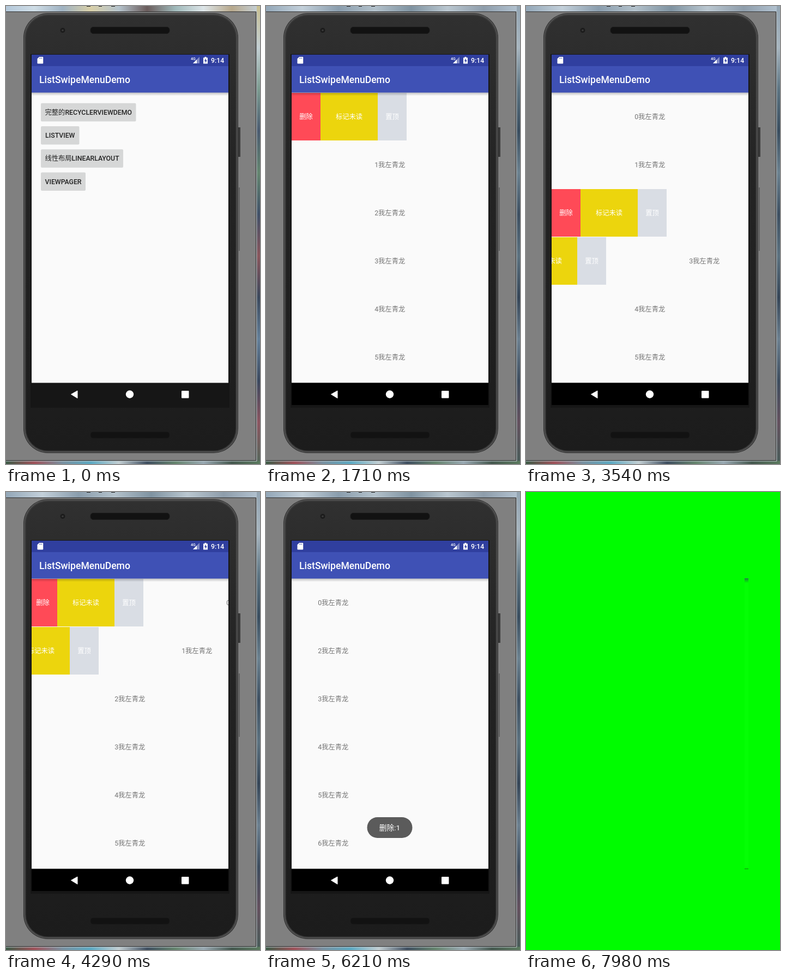
These frames come from a looping animation (466x838 px, 8000 ms). An HTML page:

```html
<!DOCTYPE html>
<html lang="zh-CN">
<head>
<meta charset="utf-8">
<title>ListSwipeMenuDemo</title>
<style>
html, body { margin: 0; width: 100%; height: 100%; overflow: hidden; background: #808080; }
svg { display: block; width: 466px; height: 838px; }
text { font: 400 12.3px Roboto, "Noto Sans CJK SC", "Noto Sans CJK", sans-serif; }
.med { font-weight: 500; }
.mid { text-anchor: middle; }
</style>
</head>
<body>
<svg id="stage" viewBox="0 0 466 838"></svg>
<script>
const LOOP = 8000, STEP = 30;
const LEFT = 47, TOP = 159, WIDE = 361, PITCH = 88, MENU = 211;
const GREEN = '#00fc00';

const rect = (x, y, w, h, fill, more = '') =>
  `<rect x="${x}" y="${y}" width="${w}" height="${h}" fill="${fill}" ${more}/>`;
const label = (x, y, str, fill, more = '') =>
  `<text x="${x}" y="${y}" fill="${fill}" ${more}>${str}</text>`;
const ramp = (id, colors, down) =>
  `<linearGradient id="${id}" x1="0" y1="0" x2="${down ? 0 : 1}" y2="${down ? 1 : 0}">` +
  colors.split(' ').map((c, i, all) => `<stop offset="${i / (all.length - 1)}" stop-color="${c}"/>`).join('') +
  '</linearGradient>';
const list = (n, make) => Array.from({ length: n }, (_, i) => make(i)).join('');

const bar = (title) =>
  rect(LEFT, 40, WIDE, 70, '#303f9f') + rect(LEFT, 110, WIDE, 48.5, '#3f51b5') +
  rect(LEFT, 158.5, WIDE, 6, 'url(#shade)') +
  label(61, 141, title, '#fff', 'class="med" style="font-size:17.57px"');

const desktop = (id, top, side) => `<g id="${id}">` +
  rect(0, 0, 466, 10, `url(#${top})`) + rect(460, 0, 6, 838, `url(#${side})`) + '</g>';

function phone() {
  const slot = (y) => rect(155, y, 145, 12, '#121212', 'rx="5" stroke="#1b1b1b"');
  const shell = (inset, fill) => rect(32 + inset, 13 + inset, 394 - 2 * inset, 805 - 2 * inset, fill, `rx="${45 - inset}"`);
  return rect(426, 222, 4, 54, '#3a3a3a') + rect(427, 332, 2, 116, '#5c5c5c') +
    shell(0, '#2b2b2b') + shell(1, '#565656') + shell(2.5, '#3c3c3c') + shell(4.5, 'url(#body)') +
    '<circle cx="104" cy="44.500" r="5" fill="#1b1b1b" stroke="#303030"/><circle cx="104" cy="44.500" r="1.800" fill="#3a3a3a"/>' +
    slot(38.5) + slot(779) + rect(45, 88, 365, 647, '#161616');
}

function home() {
  const button = (y, w, str) => rect(64, y, w, 33.5, '#d6d7d7', 'rx="2"') +
    label(64 + w / 2, y + 21, str, '#222', 'class="med mid"');
  return '<g id="home">' + rect(LEFT, 110, WIDE, 579.5, '#fafafa') + bar('ListSwipeMenuDemo') +
    button(177.8, 174.5, '完整的RECYCLERVIEWDEMO') + button(220, 70.5, 'LISTVIEW') +
    button(262.3, 151, '线性布局LINEARLAYOUT') + button(304.6, 82, 'VIEWPAGER') +
    '<g clip-path="url(#pressClip)"><circle id="press" cx="105" cy="321" r="0" fill="#000" opacity=".1"/></g></g>';
}

const rowText = (i, str, fill) =>
  label(LEFT + WIDE / 2 - .3, TOP + i * PITCH + 48.3, i + str, fill, 'class="mid"');

function swipeRow(i) {
  const y = TOP + i * PITCH;
  let x = LEFT - MENU;
  const cell = (w, fill, str) => {
    const out = rect(x, y, w, 87, fill) + label(x + w / 2, y + 48.3, str, '#fff', 'class="mid"');
    x += w;
    return out;
  };
  return `<g id="row${i}">` + cell(53, '#ff4a57', '删除') + cell(105, '#ecd50d', '标记未读') +
    cell(53, '#d9dde4', '置顶') + rowText(i, '我左青龙', '#757575') + '</g>';
}

function app() {
  return '<g clip-path="url(#screenClip)"><g id="app">' +
    rect(LEFT, 110, WIDE, 579.5, '#fafafa') + rect(LEFT, 689.5, WIDE, 45, '#000') +
    '<g clip-path="url(#listClip)"><g id="pageA">' + list(7, swipeRow) + '</g><g id="pageB">' +
    list(6, i => rowText(i, '我右白虎', '#757575')) + '</g></g>' +
    bar('ListSwipeMenuDemo') + '</g></g>';
}

function icons() {
  return '<g fill="#fff"><path d="M61 93h6q1.200 0 1.200 1.200v10q0 1.300-1.200 1.300h-8.300q-1.200 0-1.200-1.300v-7.700z"/>' +
    '<path d="M61.500 94.500v2M63.500 94.500v2M65.500 94.500v2" stroke="#303f9f" stroke-width=".8"/>' +
    '<path d="M343 105L355 93V105z" opacity=".4"/><path d="M343 105L350 98V105z"/>' +
    '<path d="M362 94.500h2.500v-1.500h3v1.500h2.500v11h-8z"/></g>' +
    '<path d="M366.800 96l-3 4.500h2v3.500l3-4.700h-2z" fill="#303f9f"/>' +
    label(339, 98.5, '4G', '#fff', 'class="med" style="font-size:7px"') +
    label(376, 104, '9:14', '#fff', 'class="med"') +
    '<g fill="#fff"><path d="M119.500 710.500L131 704V717.500z" stroke="#fff" stroke-linejoin="round"/>' +
    '<circle cx="227" cy="710.500" r="7.200"/>' + rect(322, 704, 13.5, 13.5, '#fff', 'rx="1"') + '</g>';
}

// Only what moves stays visible on the key colour.
function keyed() {
  const page = (id, str, n) => {
    const line = (i, a, b) => rowText(i, `<tspan fill="${b}">${str}</tspan>`, a);
    return `<g id="${id}">` + list(n, i => line(i, '#0c560c', '#0c560c')) + '</g>' +
      `<g id="${id}Old" opacity=".8">` + list(n, i => line(i, 'none', GREEN)) + '</g>';
  };
  return '<g id="keyed">' + rect(0, 0, 466, 838, GREEN) +
    '<g id="trail" clip-path="url(#listClip)">' + page('keyA', '我左青龙', 6) + page('keyB', '我右白虎', 6) + '</g>' +
    '<g id="specks">' + rect(LEFT - 1, 158, 1, 1, '#0c560c') + rect(LEFT - 1, 689, 1, 1, '#0c560c') + '</g>' +
    '<g id="edge">' + rect(0, 158, 1, 532, '#04ff04') + rect(0, 158, 1, 8, 'url(#cap)') +
    rect(0, 158, 1, 1, '#2a6a5a') + rect(0, 689, 1, 1, '#0a8a0a') + '</g>' +
    rect(185.5, 595, 83, 38, '#fafafa', 'id="pad" rx="19"') + '</g>';
}

const toast = '<g id="toast">' + rect(185.5, 595, 83, 38, '#5b5b5b', 'rx="19"') +
  rect(185.5, 595, 83, 38, GREEN, 'id="tint" rx="19" opacity=".1"') +
  label(227, 619, '删除:1', '#fff', 'class="mid" style="font-size:13.7px"') + '</g>';

const clip = (id, x, y, w, h) => `<clipPath id="${id}">${rect(x, y, w, h, '#000')}</clipPath>`;

document.getElementById('stage').innerHTML = '<defs>' +
  ramp('body', '#303030 #242424 #202020 #1c1c1c', true) +
  ramp('topA', '#b4c8da #cfdde6 #9fb2c2 #d8cfa8 #b5c3cc #6a5c5c #9fb9ba #dde5e8 #b7a88c #c6d3dc') +
  ramp('topB', '#93a7b8 #c3d0da #8a9dad #b3c1cb #7f93a1 #bac7d0 #8e9dab #b4c4d2') +
  ramp('base', '#3a5a44 #a05058 #7890a0 #5aaac4 #c4d0d4 #3c4c5e #64846c #9aaab4 #42564c #5a7a5e') +
  ramp('sideA', '#c9bf90 #c4d0d4 #7c9c90 #4a5a70 #64866f #405068 #8a565c #3a485c #64809a #3a485e #8c5560 #52685a', true) +
  ramp('sideB', '#93a5b3 #a8b6c0 #5c7482 #384c5e #6c8290 #3c4e60 #5c7280 #344456 #6c8090 #3c4c5e #64505e #465c58', true) +
  '<linearGradient id="shade" x1="0" y1="0" x2="0" y2="1"><stop stop-opacity=".22"/><stop offset="1" stop-opacity="0"/></linearGradient>' +
  `<linearGradient id="cap" x1="0" y1="0" x2="0" y2="1"><stop stop-color="#1a8a3a"/><stop offset="1" stop-color="${GREEN}"/></linearGradient>` +
  clip('screenClip', LEFT, 89, WIDE, 641) + clip('listClip', LEFT, TOP - 1, WIDE, 531.5) +
  clip('pressClip', 64, 304.6, 82, 33.5) + '</defs>' +
  rect(0, 0, 466, 838, '#808080') + desktop('deskA', 'topA', 'sideA') + desktop('deskB', 'topB', 'sideB') +
  rect(0, 832, 466, 6, 'url(#base)') +
  '<path d="M148 .5h7M170 .5h6M193 .5h7" stroke="#111"/>' +
  '<path d="M0 10.500H458.500V831.500H0" fill="none" stroke="#333"/><path d="M460 10V833H0" fill="none" stroke="#b4bfc4"/>' +
  phone() + '<g clip-path="url(#screenClip)">' + home() + '</g>' + app() + icons() + keyed() + toast;

const el = {};
document.querySelectorAll('[id]').forEach(e => el[e.id] = e);

const part = (t, start, len) => Math.min(1, Math.max(0, (t - start) / len));
const smooth = p => p * p * (3 - 2 * p);
const wave = p => (1 - Math.cos(Math.PI * p)) / 2;
const show = (e, on) => e.style.display = on ? '' : 'none';
const move = (e, x, y) => e.setAttribute('transform', `translate(${x} ${y})`);
const fade = (e, a) => e.setAttribute('opacity', a);

// row, start, duration, open (1) or closed (0)
const swipes = [
  [0, 1380, 330, 1], [1, 1740, 420, 1], [0, 1840, 300, 0],
  [3, 2200, 359, 1], [1, 2340, 300, 0],
  [2, 3270, 240, 1], [3, 3396, 280, 0],
  [0, 3660, 390, 1], [2, 3760, 290, 0],
  [1, 4080, 380, 1], [0, 4260, 300, 0]
];

function opened(row, t) {
  let x = 0;
  for (const [r, start, len, to] of swipes) {
    if (r === row) x += (to - x) * smooth(part(t, start, len));
  }
  return Math.round(x * MENU);
}

function paged(t) {
  const held = 140 * smooth(part(t, 6030, 270));
  return Math.round(held + (WIDE - held) * (1 - (1 - part(t, 6450, 680)) ** 5));
}

function render(t) {
  show(el.deskA, t < 540);
  show(el.deskB, t >= 540);

  el.press.setAttribute('r', 50 * part(t, 510, 180));
  show(el.app, t >= 860);
  fade(el.app, 1 - (1 - part(t, 860, 190)) ** 4);
  move(el.app, 0, 51 * (1 - part(t, 860, 350)) ** 5);

  const lift = PITCH * wave(part(t, 5320, 250));
  for (let i = 0; i < 7; i++) {
    move(el['row' + i], opened(i, t), i > 1 ? -lift : 0);
  }
  fade(el.row1, 1 - part(t, 5160, 120));

  const now = paged(t), old = paged(t - STEP);
  move(el.pageA, -now, 0);
  move(el.pageB, WIDE - now, 0);

  const key = t >= 6450, moving = now !== old;
  show(el.keyed, key);
  show(el.trail, moving);
  show(el.specks, moving);
  move(el.keyA, -now, 0);
  move(el.keyAOld, -old, 0);
  move(el.keyB, WIDE - now, 0);
  move(el.keyBOld, WIDE - old, 0);
  move(el.specks, WIDE - now, 0);

  const wide = 14 * smooth(part(t, 7260, 300)) - 7 * smooth(part(t, 7560, 420));
  show(el.edge, wide > 0);
  el.edge.setAttribute('transform', `translate(${408 - wide} 0) scale(${wide} 1)`);

  const leaving = t >= 6870 && t < 7270;
  show(el.toast, t >= 5170 && (!key || leaving));
  show(el.pad, leaving);
  show(el.tint, key);
  fade(el.toast, part(t, 5170, 340) * (1 - part(t, 6890, 380)));
}

const begin = performance.now();
function tick() {
  render((performance.now() - begin) % LOOP);
  requestAnimationFrame(tick);
}
tick();
</script>
</body>
</html>
```
